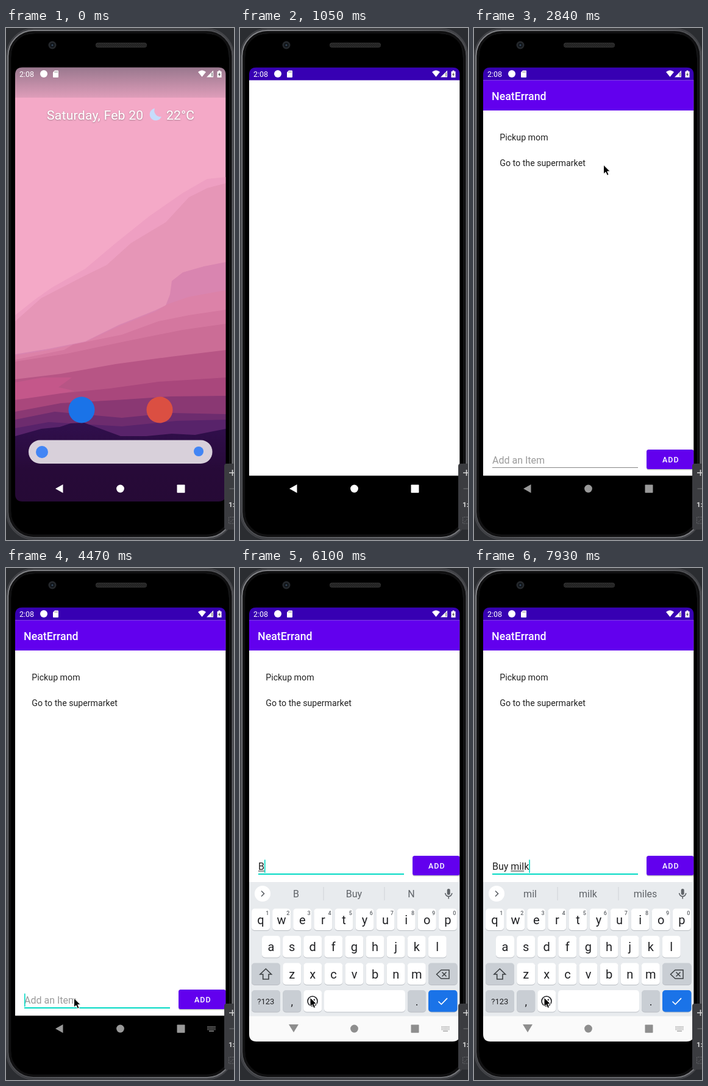
An HTML page for the animation above (8000 ms loop, 374x838 px).

```html
<!DOCTYPE html>
<html lang="en">
<head>
<meta charset="utf-8">
<title>To-do app demo</title>
<style>
html, body { margin: 0; width: 100%; height: 100%; overflow: hidden; background: #2b2d31; }
svg { display: block; width: 374px; height: 838px; }
text { font-family: Roboto, sans-serif; white-space: pre; }
.mid { text-anchor: middle; }
</style>
</head>
<body>
<svg id="stage" viewBox="0 0 374 838" xmlns="http://www.w3.org/2000/svg"></svg>
<script>
const LOOP = 8000;
const stage = document.getElementById('stage');

const rect = (x, y, w, h, fill, r = 0, more = '') =>
  `<rect x="${x}" y="${y}" width="${w}" height="${h}" rx="${r}" fill="${fill}" ${more}/>`;
const circle = (x, y, r, fill, more = '') =>
  `<circle cx="${x}" cy="${y}" r="${r}" fill="${fill}" ${more}/>`;
const path = (d, fill, more = '') => `<path d="${d}" fill="${fill}" ${more}/>`;
const line = (d, color, w = 1.5, more = '') =>
  path(d, 'none', `stroke="${color}" stroke-width="${w}" ${more}`);
const text = (x, y, size, fill, str, more = '') =>
  `<text x="${x}" y="${y}" font-size="${size}" fill="${fill}" ${more}>${str}</text>`;
const group = (id, body, more = '') => `<g id="${id}" ${more}>${body}</g>`;
// a full-width strip of the screen
const band = (top, bottom, fill, more = '') => rect(15, top, 345.5, bottom - top, fill, 0, more);

// phone body around a rounded screen opening
function phone() {
  const hole = 'M27 64.5 H348.5 Q360.5 64.5 360.5 76.5 V763 Q360.5 775 348.5 775 H27 Q15 775 15 763 V76.5 Q15 64.5 27 64.5Z';
  return path(`M8 50 Q8 9 48 9 H326 Q366 9 366 50 V790 Q366 830 326 830 H48 Q8 830 8 790Z ${hole}`, '#000', 'fill-rule="evenodd"')
    + rect(1, 1, 372.5, 836, 'none', 45, 'stroke="#434448" stroke-width="2"')
    + rect(3.5, 4, 368, 830, 'none', 42, 'stroke="url(#rim)" stroke-width="2.5"')
    + rect(6.3, 7, 362, 824, 'none', 39, 'stroke="#101011" stroke-width="4"')
    + circle(76, 28, 6.5, '#25282c') + circle(76, 28, 3.8, '#101418') + circle(76, 28, 1.6, '#34465a')
    + rect(147, 24, 84, 8, '#303030', 4) + rect(148, 25, 82, 6, 'url(#mesh)', 3);
}

function wallpaper() {
  const hill = (top, fill) => path(`M15 ${top} V775 H15Z`, fill);
  return band(64, 775, '#f4a9c7')
    + hill('470 L48 444 L75 425 L130 394 L180 352 L235 308 L290 270 L330 247 L361 244', '#ee9fc2')
    + hill('480 L58 442 L130 405 L165 388 L205 352 L262 318 L300 277 L330 262 L361 254', '#e696b7')
    + hill('534 L70 525 L130 513 L185 486 L245 462 L262 454 L269 436 L272 414 L290 400 L325 390 L361 383', '#d985b0')
    + hill('536 L70 527 L130 514 L185 488 L245 464 L265 452 L300 440 L361 429', '#dc82a8')
    + hill('543 L95 527 L110 518 L190 502 L250 480 L300 470 L361 461', '#d4779f')
    + hill('546 L100 533 L200 512 L290 494 L361 484', '#cb6d96')
    + hill('575 L90 566 L180 550 L270 538 L361 527', '#b75585')
    + path('M15 580 L60 572 L108 572 L86 588 L112 594 L60 604 L15 608Z', '#c4578a')
    + hill('609 L90 598 L170 590 L250 579 L361 572', '#a9477c')
    + hill('628 L90 614 L180 609 L270 603 L361 602', '#8a3873')
    + hill('641 L80 628 L190 638 L270 630 L361 632', '#6d2c6e')
    + hill('655 L70 645 L190 652 L280 643 L361 641', '#58236a')
    + hill('668 L58 656 L88 653 L106 647 L128 646 L150 654 L188 668 L230 668 L272 664 L310 666 L340 660 L361 656', 'url(#night)')
    + band(64, 114, 'url(#shade)');
}

function home() {
  const date = 'letter-spacing=".25" filter="url(#soft)"';
  return wallpaper()
    + text(67, 150, 21.1, '#fff', 'Saturday, Feb 20', date)
    + path('M244 131.5 A10 10 0 1 0 255 145 A10 10 0 0 1 244 131.5Z', '#c6dcfb')
    + text(263, 150, 21.1, '#fff', '22°C', date)
    + circle(124, 625, 21.5, '#1a73e8') + circle(252, 625, 21.5, '#db4f42')
    + rect(37, 674.5, 301.5, 38.5, '#d8d0da', 19)
    + circle(59, 694, 10, '#4285f4') + circle(316, 693, 8, '#4285f4');
}

function statusIcons() {
  return text(22, 79.7, 12.5, '#fff', '2:08')
    + circle(62, 75, 6, '#fff')
    + path('M80 69.5 H85 Q86 69.5 86 70.5 V80 Q86 81 85 81 H78 Q77 81 77 80 V72.5Z', '#fff')
    + line('M80.2 71 V73.2 M82.2 71 V73.2 M84.2 71 V73.2', '#777', 0.8)
    + path('M315 72 Q321.5 66.5 328 72 L321.5 80Z', '#fff')
    + path('M340 69.5 V80.5 H329Z', '#fff') + rect(337, 73, 2, 6, '#999')
    + path('M346.5 71 H348.5 V69.5 H351.5 V71 H353.5 V81 H346.5Z', '#fff')
    + path('M350.5 72.5 L348 76.8 H349.7 V79.5 L352 75.4 H350.5Z', '#555');
}

function page() {
  const list = ['Pickup mom', 'Go to the supermarket'];
  return band(85.5, 135, '#6200ee')
    + text(29, 117.5, 17.8, '#fff', 'NeatErrand', 'font-weight="500"')
    + list.map((s, i) => text(42.3, 183.6 + i * 42.6, 14.2, '#212121', s)).join('')
    + group('entry',
      rect(283, 691.5, 80, 32, '#000', 3.5, 'opacity=".22"')
      + rect(283, 690, 77.5, 32, '#6200ee', 3.5)
      + text(309, 711, 12.4, '#fff', 'ADD', 'font-weight="500" letter-spacing="1.1"')
      + text(30, 713, 16, '#9b9b9b', 'Add an Item', 'id="hint"')
      + text(30, 713, 16, '#212121', '', 'id="typed"')
      + rect(30, 714.5, 0, 1, '#212121', 0, 'id="mark"')
      + rect(30, 719, 239, 1, '#858585', 0, 'id="rule"')
      + rect(30, 696.5, 1.6, 21.5, '#03dac5', 0, 'id="caret"'));
}

function keyboard() {
  const key = (x, y, w, fill = '#fff') =>
    rect(x, y + 1, w, 35.5, '#b9bdc3', 5) + rect(x, y, w, 35.5, fill, 5);
  const grey = '#c9ced4', ink = '#202124', dim = '#5f6368';
  const row = (chars, x0, y, nums) => [...chars].map((c, i) => {
    const x = x0 + i * 34.1;
    return key(x - 15, y, 30) + text(x, y + 25, 20, ink, c, 'class="mid letter"')
      + (nums ? text(x + 10.8, y + 10, 9, dim, (i + 1) % 10, 'class="mid" font-weight="500"') : '');
  }).join('');
  return band(514, 734, '#e8ebee')
    + circle(37, 533, 13, '#fff') + line('M35 528.5 L39.5 533 L35 537.5', dim, 1.7)
    + rect(136.5, 522, 1, 22, '#cdd1d5') + rect(236.5, 522, 1, 22, '#cdd1d5')
    + [92, 187, 281].map(x => text(x, 539, 16, dim, '', 'class="mid word"')).join('')
    + rect(339.7, 525, 5, 10, dim, 2.5)
    + line('M336.7 532 A5.5 5.5 0 0 0 347.7 532 M342.2 537.5 V541.5', dim, 1.6)
    + row('qwertyuiop', 34, 557.5, true)
    + row('asdfghjkl', 51, 602)
    + key(19, 646.5, 47, grey) + row('zxcvbnm', 85.2, 646.5) + key(309, 646.5, 47.5, grey)
    + line('M42.3 656 L51.5 665 H47 V673 H37.7 V665 H33Z', '#3c4043', 1.6)
    + line('M330 658 H343 V672 H330 L322.5 665Z M331.5 661.5 L338.5 668.5 M338.5 661.5 L331.5 668.5', '#3c4043', 1.5)
    + key(19, 691, 47, grey) + text(42.4, 714, 13, ink, '?123', 'class="mid"')
    + key(70.2, 691, 30, grey) + text(85.2, 716, 18, ink, ',', 'class="mid"')
    + key(104.2, 691, 30)
    + circle(119, 709, 8, 'none', `stroke="${ink}" stroke-width="1.6"`)
    + circle(116.2, 706.8, 1.2, ink) + circle(121.8, 706.8, 1.2, ink)
    + path('M114.5 710.5 H123.5 Q119 717 114.5 710.5Z', ink)
    + key(138, 691, 133) + key(275, 691, 30, grey) + text(290, 716, 18, ink, '.', 'class="mid"')
    + key(309, 691, 47.5, '#1a73e8') + line('M325.5 709.5 L330.3 714 L340 704.2', '#fff', 1.7);
}

function keysIcon() {
  let dots = '';
  for (let r = 0; r < 3; r++)
    for (let c = 0; c < 6; c++) dots += rect(330.5 + c * 2.3, 750 + r * 2.4, 1.4, 1.4, '#a0a0a0');
  return dots + rect(333, 757.3, 8, 1.3, '#a0a0a0');
}

function nav() {
  return path('M81 754 L93.5 747 V761Z', 'inherit', 'id="back"')
    + circle(187.5, 754, 6.4, 'inherit')
    + rect(280.5, 747.5, 13, 13.2, 'inherit', 0.8);
}

function sidePanel() {
  return path('M374 713 H362 Q358 713 358 717 V817 Q358 821 362 821 H374Z', '#3b3c40')
    + line('M366 728 H374 M371.5 723 V733', '#d8d8d8', 1.6)
    + line('M366.5 754 H374', '#66676b', 1.4)
    + text(365, 784, 11.5, '#dcdcdc', '1:1', 'font-weight="700"')
    + line('M374 800.5 H365.5 V811 H374 M368 808.5 L374 803', '#5f6064', 1, 'stroke-dasharray="3 1"');
}

stage.innerHTML = `<defs>
  <linearGradient id="rim" x2="1" y2="1"><stop stop-color="#85868a"/><stop offset=".5" stop-color="#4b4c50"/><stop offset="1" stop-color="#77787c"/></linearGradient>
  <linearGradient id="night" x2="0" y2="1"><stop stop-color="#310f4e"/><stop offset=".6" stop-color="#270a38"/><stop offset="1" stop-color="#260a36"/></linearGradient>
  <linearGradient id="shade" x2="0" y2="1"><stop stop-color="#505060" stop-opacity=".56"/><stop offset="1" stop-color="#505060" stop-opacity=".13"/></linearGradient>
  <pattern id="mesh" width="3" height="3" patternUnits="userSpaceOnUse">${line('M0 3 L3 0', '#111', 1)}</pattern>
  <filter id="soft"><feDropShadow dx="0" dy=".8" stdDeviation="1" flood-color="#555" flood-opacity=".6"/></filter></defs>`
  + rect(0, 0, 374, 838, '#2b2d31')
  + group('home', home())
  + group('app', band(64.5, 775, '#000') + band(64.5, 86, '#3700b3')
    + band(85.5, 732.7, '#fff') + group('page', page()))
  + group('keys', keyboard())
  + band(733.5, 775, '#fafafa', 'id="tray"')
  + phone()
  + statusIcons() + group('nav', nav()) + group('keysIcon', keysIcon())
  + sidePanel()
  + group('mouse', path('M0 0 V15 L3.5 11.8 L6 17.3 L8.6 16.2 L6.2 10.8 H10.8Z', '#000', 'stroke="#fff" stroke-width="1"'));

const el = id => document.getElementById(id);
const show = (id, on) => el(id).setAttribute('display', on ? 'inline' : 'none');
const attr = (id, name, v) => el(id).setAttribute(name, v);
const letters = [...stage.querySelectorAll('.letter')];
const words = [...stage.querySelectorAll('.word')];
const pen = document.createElement('canvas').getContext('2d');
const width = s => { pen.font = '16px Roboto, sans-serif'; return pen.measureText(s).width; };

// screen refreshes: first time, last time, count
const runs = [[0, 0, 1], [900, 1800, 7], [1950, 2250, 3], [2550, 3580, 8], [3730, 4470, 6],
  [4760, 5060, 3], [5500, 5500, 1], [5800, 5800, 1], [6100, 6100, 1], [6540, 7420, 7], [7630, 7930, 3]];
const ticks = runs.flatMap(([a, b, n]) =>
  Array.from({ length: n }, (_, i) => n > 1 ? Math.round((a + (b - a) * i / (n - 1)) / 10) * 10 : a));

const moves = [[1350, 14, 2], [1800, 180, 262], [2250, 212, 246], [2840, 212.5, 224],
  [3580, 150, 636], [4170, 111.5, 704], [4760, 111.5, 704], [5060, 115, 703]];

const typing = [[5800, 'B'], [6540, 'Bu'], [6830, 'Buy'], [6980, 'Buy '], [7270, 'Buy m'],
  [7630, 'Buy mi'], [7780, 'Buy mil'], [7930, 'Buy milk']];

// suggestions and underline trail the typing
const hints = [[0, '', 'I The Thank'], [6100, 'B', 'B Buy N'], [6690, 'Bu', 'Bu But Buying'],
  [6980, 'Buy', 'Buy But Buying'], [7130, 'Buy ', 'a the it'], [7420, 'Buy m', 'm my me'],
  [7780, 'Buy mi', 'mi mini mind'], [7930, 'Buy mil', 'mil milk miles']];

const latest = (list, t) => list.filter(item => item[0] <= t).pop();
const ramp = (t, a, b) => Math.min(1, Math.max(0, (t - a) / (b - a)));

function place(t) {
  const i = moves.findIndex(m => m[0] > t);
  if (i < 0) return moves[moves.length - 1].slice(1);
  const [a, b] = [moves[i - 1], moves[i]], k = ramp(t, a[0], b[0]);
  return [a[1] + (b[1] - a[1]) * k, a[2] + (b[2] - a[2]) * k];
}

function draw(now) {
  const t = ticks.filter(v => v <= now).pop();

  const open = ramp(t, 900, 1050), s = 0.894 + 0.106 * open;
  show('home', t < 1050);
  show('app', t >= 900);
  attr('app', 'opacity', 0.66 + 0.34 * open);
  attr('app', 'transform', `translate(187.7 419.5) scale(${s}) translate(-187.7 -419.5)`);
  show('page', t >= 2550);

  const up = t >= 4760, focus = t >= 4320;
  attr('entry', 'transform', `translate(0 ${up ? -219 : 0})`);
  show('keys', up);
  show('tray', up);
  attr('keys', 'transform', `translate(0 ${220 * Math.pow(1 - ramp(t, 4610, 5060), 2)})`);
  letters.forEach(n => {
    const c = n.textContent;
    n.textContent = t < 5500 ? c.toUpperCase() : c.toLowerCase();
  });

  const typed = (latest(typing, t) || [0, ''])[1];
  const [, done, offer] = latest(hints, t);
  const start = done.lastIndexOf(' ') + 1;
  el('typed').textContent = typed;
  show('hint', !typed);
  attr('mark', 'x', 30 + width(done.slice(0, start)));
  attr('mark', 'width', width(done.slice(start)));
  attr('rule', 'height', focus ? 2 : 1);
  attr('rule', 'fill', focus ? '#03dac5' : '#858585');
  show('caret', focus && t !== 5500);
  attr('caret', 'x', 30 + width(typed));
  offer.split(' ').forEach((w, i) => { words[i].textContent = w; });

  const tone = Math.round(255 - 102 * ramp(t, 1800, 2250));
  attr('nav', 'fill', up ? '#8e8e8e' : `rgb(${tone},${tone},${tone})`);
  attr('back', 'd', up ? 'M80 747 H96 L88 760Z' : 'M81 754 L93.5 747 V761Z');
  show('keysIcon', t >= 4470);

  show('mouse', t >= 1350);
  if (t >= 1350) attr('mouse', 'transform', `translate(${place(t)})`);
}

function tick() {
  draw(performance.now() % LOOP);
  requestAnimationFrame(tick);
}
tick();
</script>
</body>
</html>
```
